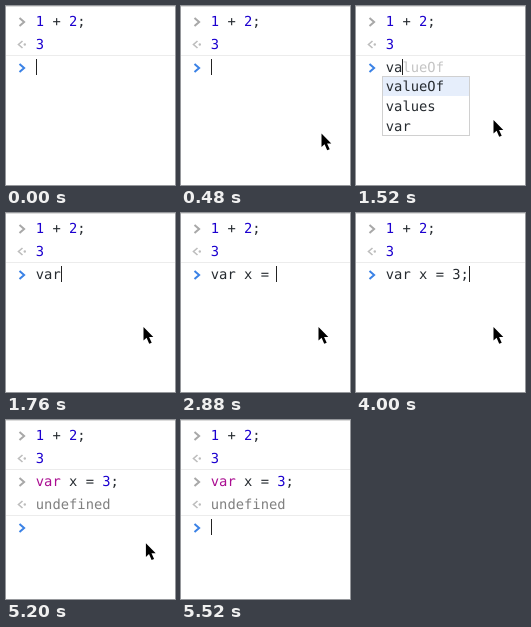
Animation of 169x179 px, one loop 5.76 s. Source, as an HTML page:

```html
<!DOCTYPE html>
<html lang="en">
<head>
<meta charset="utf-8">
<title>Console session</title>
<style>
html, body { margin: 0; width: 100%; height: 100%; overflow: hidden; background: #fff; }
svg { display: block; width: 169px; height: 179px; }
text { font: 13.8px "DejaVu Sans Mono", monospace; text-rendering: geometricPrecision; white-space: pre; fill: #262b30; }
.num { fill: #1c00cf; }
.key { fill: #aa0d91; }
.dim { fill: #808080; }
.ghost { fill: #c4c4c4; }
</style>
</head>
<body>
<svg id="stage"></svg>
<script>
const LOOP = 5760, STEP = 80, ROW = 23;
const CODE = 'var x = 3;';
const WORDS = ['valueOf', 'values', 'var', 'void'];
const keyTimes = [1040, 1520, 1760, 2000, 2240, 2640, 2800, 2880, 3600, 4000];
const caretX = [30, 38, 46, 55, 62, 71, 79, 87, 95, 105, 113];
const caretOff = [[3360, 3600], [4480, 4560], [5040, 5520]];
const stage = document.getElementById('stage');

const span = (cls, s) => `<tspan class="${cls}">${s}</tspan>`;
const rect = (x, y, w, h, fill) => `<rect x="${x}" y="${y}" width="${w}" height="${h}" fill="${fill}"/>`;
const label = (y, s) => `<text x="29.8" y="${y}">${s}</text>`;
const line = (row, s) => label(20 + row * ROW, s);
const rule = row => rect(0, 3 + row * ROW, 169, 1, '#ececec');

const chevron = (row, color) =>
  `<path d="M13.5 ${12 + row * ROW}l4.6 4-4.6 4" fill="none" stroke="${color}" stroke-width="2"/>`;
const resultMark = row => {
  const y = 15.5 + row * ROW;
  return `<path d="M16.5 ${y - 3.5}l-4 3.5 4 3.5" fill="none" stroke="#bdbdbd" stroke-width="1.6"/>` +
    `<circle cx="18.8" cy="${y}" r="1.2" fill="#bdbdbd"/>`;
};

function popup(words) {
  const h = words.length * 20;
  return rect(26, 70, 88, h, '#d0d0d0') + rect(27, 71, 86, h - 2, '#fff') +
    rect(27, 71, 86, 19, '#e6eefb') +
    words.map((w, i) => label(85 + i * 20, w)).join('');
}

function pointer(t) {
  if (t < 320 || t >= 5520) return '';
  let x = 137, y = 114;
  if (t < 640) {
    const e = (1 - (t - 320) / 320) ** 2;
    x += 12 * e;
    y += 54 * e;
  } else if (t > 5040) {
    const e = ((t - 5040) / 400) ** 2;
    x += 15 * e;
    y += 58 * e;
  }
  return `<path transform="translate(${x} ${y})" d="M.5 0V13.6L3.6 10.8 6.2 16.8 8.7 15.7 6.1 9.9H10.3Z"
    fill="#000" stroke="#fff" stroke-width="1.4" paint-order="stroke"/>`;
}

function picture(t) {
  const typed = keyTimes.filter(k => t >= k).length;
  const sent = t >= 4560, done = t >= 4640;
  const row = done ? 4 : sent ? 3 : 2;
  const hints = t >= 1120 && t < 1760;
  const start = CODE.slice(0, typed);

  let s = rect(0, 0, 169, 1, '#dcdcdc') + rule(2) +
    chevron(0, '#a8a8a8') + line(0, `${span('num', 1)} + ${span('num', 2)};`) +
    resultMark(1) + line(1, span('num', 3));
  if (sent) s += chevron(2, '#a8a8a8') + line(2, `${span('key', 'var')} x = ${span('num', 3)};`);
  if (done) s += resultMark(3) + line(3, span('dim', 'undefined')) + rule(4);
  s += chevron(row, '#3b82e6');
  if (!sent) s += line(2, start + (hints ? span('ghost', WORDS[0].slice(typed)) : ''));
  if (hints) s += popup(WORDS.filter(w => w.startsWith(start)));
  if (!caretOff.some(([a, b]) => t >= a && t < b))
    s += rect(caretX[sent ? 0 : typed], 7 + row * ROW, 1, 16, '#222');
  return s + pointer(t);
}

let last = -1;
function frame() {
  const t = Math.floor(performance.now() % LOOP / STEP) * STEP;
  if (t !== last) stage.innerHTML = picture(last = t);
  requestAnimationFrame(frame);
}
frame();
</script>
</body>
</html>
```
